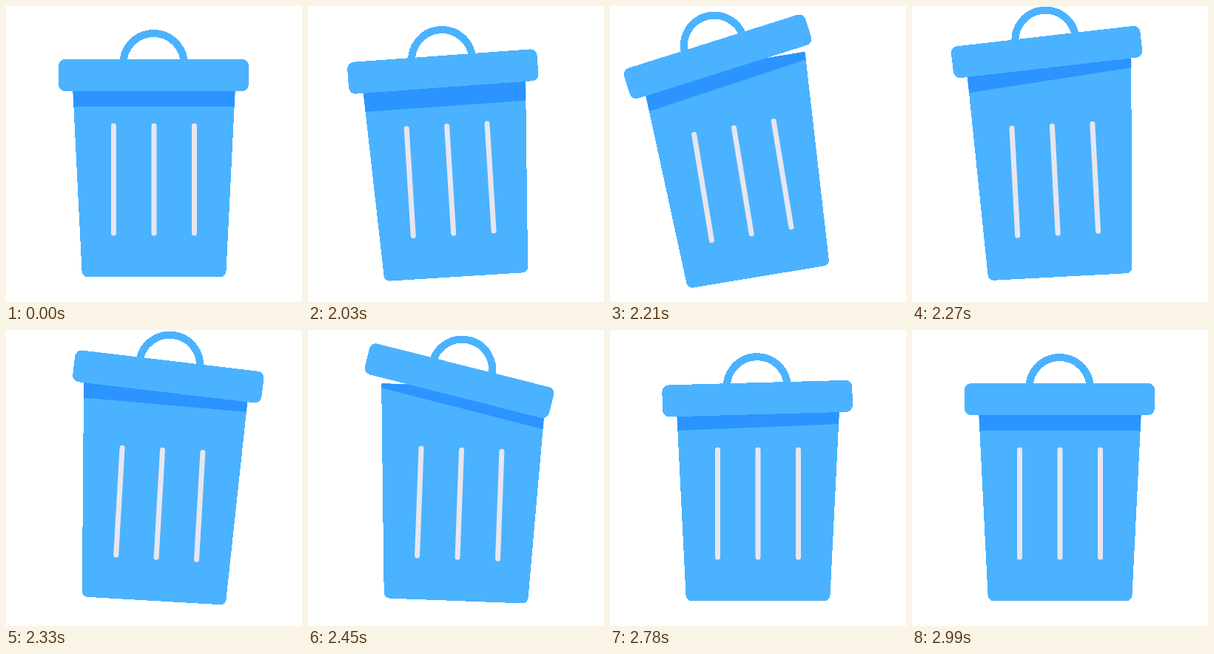
Animation, 400 px wide and 400 px high, one loop 3.02 s. Source, as an HTML page:

```html
<!DOCTYPE html>
<html>
<head>
<meta charset="utf-8">
<title>Trash can</title>
<style>
  html, body { margin: 0; width: 100%; height: 100%; overflow: hidden; background: #fff; }
  svg { display: block; width: 100vw; height: 100vh; }
  .crisp { shape-rendering: crispEdges; }
</style>
</head>
<body>
<svg viewBox="0 0 400 400">
  <defs>
    <path id="shell" d="M90 76H310Q311.5 76 311.5 78L297.5 358Q297 366 289 366H111Q103 366 102.5 358L88.5 78Q88.5 76 90 76Z"/>
    <clipPath id="inside"><use href="#shell"/></clipPath>
  </defs>
  <g id="can">
    <use class="crisp" href="#shell" fill="#4bb2ff"/>
    <g clip-path="url(#inside)">
      <rect id="shade" x="50" y="16" width="300" height="120" fill="#2b94ff"/>
    </g>
    <path d="M145.5 162V307M200 162V307M254.5 162V307" stroke="#e8e6ef" stroke-width="7" stroke-linecap="round"/>
    <g id="lid" class="crisp">
      <path d="M158.5 80V78A41 41 0 0 1 240.5 78V80" fill="none" stroke="#4bb2ff" stroke-width="10"/>
      <rect x="71" y="72" width="257" height="43" rx="9" fill="#4bb2ff"/>
    </g>
  </g>
</svg>
<script>
const LOOP = 3020, START = 2000, STEP = 30;

const swing = u => (1 - Math.cos(Math.PI * u)) / 2;
const glide = u => Math.sin(Math.PI * u / 2);
const kick = u => 1 - (1 - u) ** 2.3;

// Moves from rest through [ms after START, value] poses; the first move has its own easing.
function track(firstEase, ...poses) {
  poses.unshift([0, 0]);
  return t => {
    const next = poses.findIndex(p => p[0] > t);
    if (next < 0) return 0;
    const [t0, v0] = poses[next - 1], [t1, v1] = poses[next];
    const ease = next === 1 ? firstEase : swing;
    return v0 + (v1 - v0) * ease((t - t0) / (t1 - t0));
  };
}

const canTurn = track(kick, [180, -10.4], [360, 4.3], [540, 0]);
const lidTurn = track(swing, [180, -8.7], [450, 12], [630, -2.3], [1020, 0]);
const lidShift = track(swing, [210, -5.4], [330, 2.5], [450, -6], [840, 0]);
const lidLift = track(glide, [270, 32], [840, 0]);
const shadeTurn = track(swing, [210, -8.9], [450, 12.3], [630, -3.4], [1020, 0]);
const shadeLift = track(swing, [270, 36], [930, 0]);

const [can, lid, shade] = ["can", "lid", "shade"].map(id => document.getElementById(id));

function place(part, angle, x, y, dx = 0, dy = 0) {
  part.setAttribute("transform", `translate(${dx} ${dy}) rotate(${angle} ${x} ${y})`);
}

function draw(now) {
  const t = Math.floor(Math.max(0, now % LOOP - START) / STEP) * STEP;
  place(can, canTurn(t), 200, 361);
  place(lid, lidTurn(t), 199.5, 93.5, lidShift(t), -lidLift(t));
  place(shade, shadeTurn(t), 200, 136, 0, -shadeLift(t));
}

const begin = performance.now();
function tick() {
  draw(performance.now() - begin);
  requestAnimationFrame(tick);
}
tick();
</script>
</body>
</html>
```
